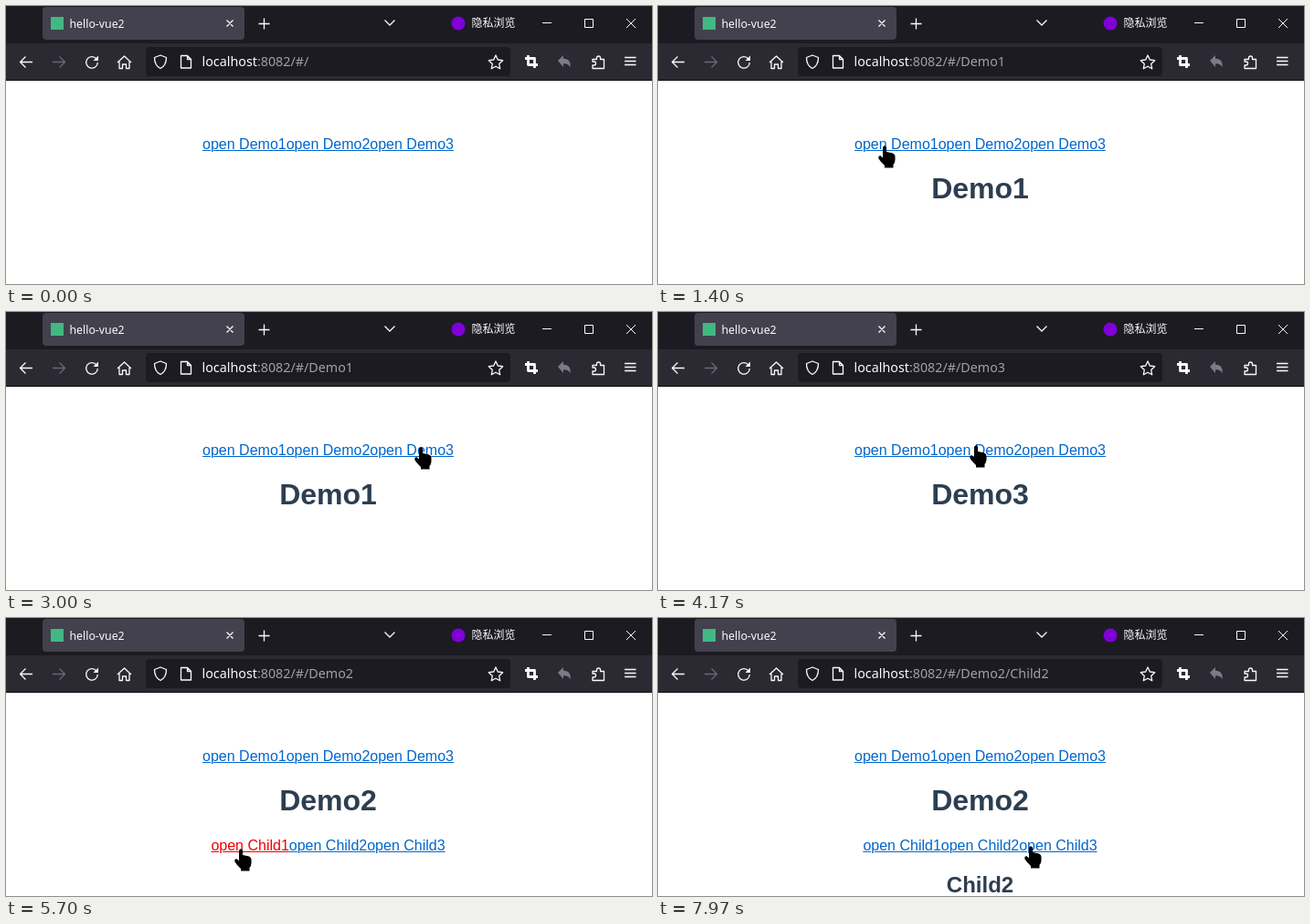
Write an HTML page that moves like this. It is 707x305 px and loops after 8000 ms.

```html
<!DOCTYPE html>
<html lang="en">
<head>
<meta charset="utf-8">
<title>Nested routes</title>
<style>
  html, body { margin: 0; width: 707px; height: 305px; overflow: hidden; background: #fff; }
  svg { position: absolute; left: 0; top: 0; }
  .ui { font-family: "Noto Sans", "Open Sans", sans-serif; fill: #fbfbfe; }
  #app {
    position: absolute; top: 143px; width: 705px; text-align: center;
    font: 16px "Liberation Sans", Arial, sans-serif; color: #2c3e50;
  }
  nav { height: 18px; line-height: 18px; white-space: nowrap; }
  nav span { color: #06c; text-decoration: underline 1px; }
  nav span.active { color: #e00; }
  h1 { font-size: 32px; line-height: 37px; margin: 21.4px 0; }
  h2 { font-size: 24px; line-height: 27px; margin: 19.9px 0; }
</style>
</head>
<body>
<div id="app">
  <nav><span>open Demo1</span><span>open Demo2</span><span>open Demo3</span></nav>
  <h1></h1>
  <nav id="children"><span>open Child1</span><span>open Child2</span><span>open Child3</span></nav>
  <h2></h2>
</div>

<svg width="707" height="305">
  <!-- tab strip, toolbar and address field -->
  <path fill="#1c1b22" d="M0 0h707v41H0z"/>
  <path fill="#2b2a33" d="M0 41h707v40H0z"/>
  <path fill="#0c0c0d" d="M0 81h707v1H0z"/>
  <rect x="40" y="1" width="221" height="36" rx="4" fill="#42414d"/>
  <rect x="153" y="45" width="399" height="32" rx="4" fill="#1c1b22"/>

  <rect x="49" y="12" width="14" height="14" fill="#41b883"/>
  <circle cx="495" cy="19" r="7.5" fill="#8000d7"/>

  <g class="ui">
    <text x="69.5" y="24" font-size="12.3">hello-vue2</text>
    <text x="509.5" y="23.3" font-size="12" style="font-family:'Noto Sans CJK SC','Noto Sans CJK',sans-serif">隐私浏览</text>
    <text x="214.5" y="66" font-size="14.3">localhost<tspan id="url" fill="#a0a0a8"></tspan></text>
  </g>

  <g fill="none" stroke="#fbfbfe" stroke-width="1.3" stroke-linejoin="round">
    <path d="M241.5 15.500l7 7m0-7l-7 7M276.500 19.500h12m-6-6v12M414.500 15.500l5.500 5.500 5.500-5.500"/>
    <path stroke-width="1" d="M587 18.500h10M633.500 14.500h9v9h-9zM679 14l10 10m0-10l-10 10"/>
    <path d="M29 61.500H15.500m6-6l-6 6 6 6"/>
    <path stroke="#6a6973" d="M51 61.500h13.500m-6-6l6 6-6 6"/>
    <path d="M99 58A6.300 6.300 0 1 0 100.300 62"/>
    <path d="M101 54.500v5.500h-5.500z" fill="#fbfbfe" stroke="none"/>
    <path d="M122 62l7.500-7 7.500 7M124 61v7.500h3.500v-4.500h4v4.500h3.500V61"/>
    <path d="M169 54l6.500 2.500c0 6-1.500 9.500-6.500 12-5-2.500-6.500-6-6.500-12z"/>
    <path d="M191.500 54.500h7l4 4v9.500h-11zM198.500 54.500v4h4"/>
    <path d="M536 54l2.300 5 5.400.7-4 3.800 1 5.300-4.700-2.600-4.700 2.600 1-5.300-4-3.800 5.400-.7z"/>
    <path stroke-width="2.800" d="M571.500 54v10.500H582M568 57.500h10.500V68"/>
    <path d="M604 60l6-6v3.800c6 0 8.500 4 7.500 9.500-1.500-3-3-4-7.500-4V67z" fill="#7d7c86" stroke="none"/>
    <path d="M642 58.500h4.500V57a2 2 0 0 1 4 0v1.500h4v10H642V65h1.500a2 2 0 0 0 0-4H642z"/>
    <path d="M677 56.500h12.500m-12.500 4h12.500m-12.500 4h12.500"/>
  </g>

  <!-- both pointers have their hot spot at 0,0 -->
  <g id="pointer">
    <path id="hand" d="M-2 2Q0-1.500 2 2V7L9 8.500Q11.500 9.500 11.500 12V16Q11.500 18.500 9.500 21V24.500H0V22Q-4.500 18-6.500 14.500Q-7.500 11-4.500 11.300L-2 13.500Z"/>
    <path id="arrow" d="M0 0V17L4 13.200 6.500 19 9.300 17.800 6.800 12.200H12Z"/>
  </g>
</svg>

<script>
const LOOP = 8000;
const $ = s => document.querySelector(s);
const links = [...document.querySelectorAll("nav span")];

// moves: start, end, from x, y, to x, y
const moves = [
  [500, 1000, 342, 279, 248, 153],
  [1800, 2430, 248, 153, 386, 148],
  [2600, 2830, 386, 148, 491, 150],
  [2830, 3000, 491, 150, 454, 148],
  [3700, 4170, 454, 148, 348, 146],
  [4970, 5670, 348, 146, 257, 253],
  [5970, 5971, 257, 253, 258, 252],
  [6800, 7250, 258, 252, 337, 252],
  [7800, 7970, 338, 251, 408, 250]
];

// clicks: press, release, link index, page, child
const clicks = [
  [1230, 1370, 0, "Demo1", ""],
  [3100, 3170, 2, "Demo3", ""],
  [4300, 4370, 1, "Demo2", ""],
  [5700, 5770, 3, "Demo2", "Child1"],
  [7400, 7500, 4, "Demo2", "Child2"]
];

function pointerAt(t) {
  const [start, end, x0, y0, x1, y1] = moves.findLast(m => t >= m[0]);
  const p = Math.min(1, (t - start) / (end - start));
  const k = p * p * (3 - 2 * p);
  return [x0 + (x1 - x0) * k, y0 + (y1 - y0) * k];
}

const show = (el, on) => el.style.visibility = on ? "visible" : "hidden";

function draw(t) {
  const [, , , page, child] = clicks.findLast(c => t >= c[1]) || [0, 0, 0, "", ""];
  const pressed = clicks.find(c => t >= c[0] && t < c[1]);
  const nested = page === "Demo2";

  $("#url").textContent = ":8082/#/" + page + (child && "/" + child);
  $("h1").textContent = page;
  $("h2").textContent = child;
  show($("#children"), nested);
  links.forEach((el, i) => el.classList.toggle("active", !!pressed && pressed[2] === i));

  const visible = t >= moves[0][0];
  let overLink = false;
  if (visible) {
    const [x, y] = pointerAt(t);
    $("#pointer").setAttribute("transform", `translate(${Math.round(x)} ${Math.round(y)})`);
    overLink = (y >= 142 && y < 160 && x >= 215 && x <= 491) ||
      (nested && y >= 240 && y < 258 && x >= 224 && x <= 481);
  }
  show($("#hand"), visible && overLink);
  show($("#arrow"), visible && !overLink);
}

function tick() {
  draw(performance.now() % LOOP);
  requestAnimationFrame(tick);
}
tick();
</script>
</body>
</html>
```
